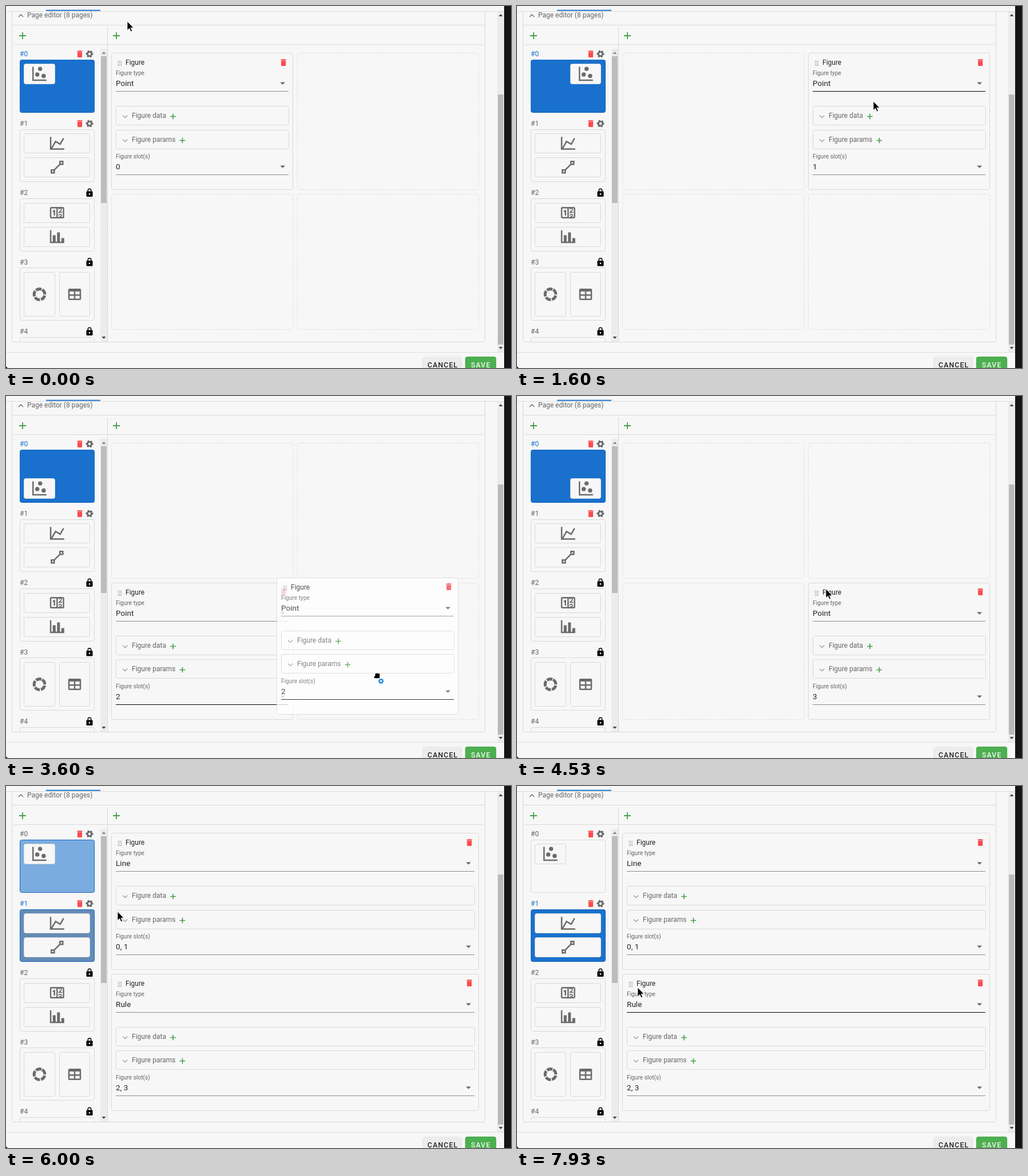
An HTML page that plays this animation: 883 by 634 pixels, repeating every 8 s.

```html
<!DOCTYPE html>
<html lang="en">
<head>
<meta charset="utf-8">
<title>Page editor</title>
<style>
  html, body { margin: 0; width: 100%; height: 100%; overflow: hidden; background: #f7f7f7; }
  svg { display: block; font-family: Roboto, sans-serif; font-size: 12px; }
</style>
</head>
<body>
<svg id="stage" width="883" height="634" viewBox="0 0 883 634"><g id="base"></g><g id="live"></g></svg>
<script>
const LOOP = 8000, STEP = 1000 / 15;
const BLUE = '#1971cd', GREY = '#666', EDGE = '#d9d9d9', PAPER = '#f7f7f7', GREEN = '#43a047';
const round = Math.round;

// Drawing helpers
const fill = (x, y, w, h, color, r = 0) =>
  `<rect x="${x}" y="${y}" width="${w}" height="${h}" rx="${r}" fill="${color}"/>`;
const box = (x, y, w, h, { bg = 'none', edge = EDGE, r = 3, dash = '' } = {}) =>
  `<rect x="${round(x) + .5}" y="${round(y) + .5}" width="${round(w)}" height="${round(h)}" rx="${r}" fill="${bg}" stroke="${edge}" stroke-dasharray="${dash}"/>`;
const text = (x, y, s, color = GREY, size = 12, extra = '') =>
  `<text x="${x}" y="${y}" fill="${color}" font-size="${size}" ${extra}>${s}</text>`;
const line = (d, color, w = 1, extra = '') =>
  `<path d="${d}" fill="none" stroke="${color}" stroke-width="${w}" ${extra}/>`;
const plus = (x, y, r, w) => line(`M${x - r} ${y}h${2 * r}M${x} ${y - r}v${2 * r}`, GREEN, w);
const chevron = (x, y, dir, color) => line(`M${x - 4} ${y - 2 * dir}l4 ${4 * dir}l4 ${-4 * dir}`, color, 1.3);
const triangle = (x, y, w, h, color) => `<path d="M${x - w} ${y - h / 2}h${2 * w}l${-w} ${h}z" fill="${color}"/>`;

// Icons on a 24-unit grid, placed by their centre
const ICONS = {
  trash: 'M19 4H15.5L14.5 3H9.5L8.5 4H5V6H19M6 19A2 2 0 0 0 8 21H16A2 2 0 0 0 18 19V7H6Z',
  lock: 'M12 17A2 2 0 0 0 12 13A2 2 0 0 0 12 17M18 8A2 2 0 0 1 20 10V20A2 2 0 0 1 18 22H6A2 2 0 0 1 4 20V10A2 2 0 0 1 6 8H7V6A5 5 0 0 1 17 6V8M12 3A3 3 0 0 0 9 6V8H15V6A3 3 0 0 0 12 3Z',
  scatter: 'M2 2H4V20H22V22H2Z' + [[9, 13], [13, 5], [18, 15]].map(([x, y]) => `M${x - 3} ${y}a3 3 0 0 1 6 0a3 3 0 0 1 -6 0`).join(''),
  lines: 'M16 11.78L20.24 4.45L21.97 5.45L16.74 14.5L10.23 10.75L5.46 19H22V21H2V3H4V17.54L9.5 8Z',
  rule: 'M15 3V7.59L7.59 15H3V21H9V16.42L16.42 9H21V3M17 5H19V7H17M5 17H7V19H5',
  bars: 'M22 21H2V3H4V19H6V10H10V19H12V6H16V19H18V14H22Z',
  table: 'M5 4H19A2 2 0 0 1 21 6V18A2 2 0 0 1 19 20H5A2 2 0 0 1 3 18V6A2 2 0 0 1 5 4M5 8V12H11V8M13 8V12H19V8M5 14V18H11V14M13 14V18H19V14'
};
const icon = (name, x, y, scale = 1.25, color = '#6b6b6b') =>
  `<path transform="translate(${x} ${y}) scale(${scale}) translate(-12 -12)" d="${ICONS[name]}" fill="${color}" fill-rule="evenodd"/>`;
const trash = (x, y) => icon('trash', x, y, .68, '#f94c4f');
const gear = (x, y) =>
  `<g fill="none" stroke="#666" transform="translate(${x} ${y}) rotate(-15)"><circle r="3.7" stroke-width="2.7"/><circle r="5.5" stroke-width="2" stroke-dasharray="3 2.76"/></g>`;
const counter = (x, y) =>
  `<g transform="translate(${x} ${y})" fill="none" stroke="#6b6b6b" stroke-width="2.4"><rect x="-11.3" y="-8.8" width="22.6" height="17.6" rx="1.5"/>` +
  `<path d="M0 -9V9M-7.5 -2.2L-4.6 -3.4V5"/><path stroke-width="1.7" d="M3.2 -6C4 -9 8.5 -8 7.4 -5L3.6 -.6H9M3.2 5C3.5 2 8 2 7.6 5Q7 7.5 4 7.4"/></g>`;
const donut = (x, y) =>
  `<circle cx="${x}" cy="${y}" r="9.3" fill="none" stroke="#6b6b6b" stroke-width="5" stroke-dasharray="9.9 1.79" transform="rotate(-60 ${x} ${y})"/>`;

function base() {
  const pageTop = i => 94.4 + 121.5 * i;
  let s = fill(0, 0, 883, 634, PAPER)
    + fill(0, 9, 871, 1, '#dcdcdc') + fill(70, 6.7, 95, 1.9, BLUE)
    + line('M10.5 10V584Q10.5 588.5 14.5 588.5H833Q837.5 588.5 837.5 584V10M10 33.5H837M14 67.5H834M177.5 38V588', EDGE)
    + chevron(26, 17, -1, GREY) + text(37, 20, 'Page editor (8 pages)')
    + plus(29, 52, 6, 1.8) + plus(193, 52, 6, 1.8);
  // Scroll bars
  s += fill(165, 75, 12, 513, '#ececec') + fill(166, 88, 10, 257, '#bcbcbc')
    + triangle(171, 82, 3.5, -4, '#8a8a8a') + triangle(171, 581, 3.5, 4, '#444')
    + fill(859, 10, 12, 596, '#ececec') + fill(860, 155, 9.5, 438, '#bababa')
    + triangle(865, 16, 3.5, -4, '#444') + triangle(865, 599, 3.5, 4, '#444')
    + fill(871, 0, 12, 634, '#131517');
  // Locked pages
  for (const i of [2, 3, 4]) {
    const y = pageTop(i);
    s += text(24, round(y - 6), '#' + i) + icon('lock', 146, y - 10.2, .69, '#000');
    if (i < 4) s += box(24, y - .5, 130, 92);
  }
  s += line('M24.5 588V584Q24.5 580.5 28 580.5H150Q154.5 580.5 154.5 584V588', EDGE)
    + box(31, 345, 115, 34) + counter(89.3, 362) + box(31, 387, 115, 34) + icon('bars', 89.3, 404)
    + box(31, 466, 54, 77) + donut(58.5, 505) + box(93, 466, 53, 77) + icon('table', 120, 505);
  // Footer
  const button = 'font-weight="500" letter-spacing="1.1"';
  s += fill(0, 606, 871, 1, '#dcdcdc')
    + fill(728.5, 615, 68.5, 24, '#d4d4d4', 4) + fill(729, 614, 67.5, 24, '#ececec', 4) + text(737, 633, 'CANCEL', '#222', 12.3, button)
    + fill(802.5, 615, 55, 24, '#c9d3c9', 4) + fill(803, 614, 54, 24, '#4caf50', 4) + text(813, 633, 'SAVE', '#eef6ee', 12.3, button)
    + '<path d="M0 631V634H3z" fill="#222"/>';
  return s;
}

function card(x, y, w, type, slots, hover, bg = 'none', h = 238.6) {
  const at = dy => round(y + dy);
  const select = (dy, label, value, dark) =>
    text(x + 8, at(dy) - 28, label, GREY, 10.2) + text(x + 8, at(dy) - 9, value, '#222', 13.6)
    + triangle(x + w - 17.3, at(dy) - 13.4, 4.4, 4.4, GREY)
    + fill(x + 8, at(dy), w - 15, 1, dark ? '#000' : '#8c8c8c');
  const section = (dy, label, plusX) =>
    box(x + 8, at(dy), w - 15, 33) + chevron(x + 24.3, at(dy) + 18.7, 1, '#999')
    + text(x + 36, at(dy) + 21, label) + plus(x + plusX, at(dy) + 18.5, 4.8, 1.6);
  return box(x, at(0), w, h, { bg })
    + line([12.5, 15, 17.5].map(dx => `M${x + dx} ${at(14)}v9.5`).join(''), '#888', 1.2, 'stroke-dasharray="1.2 1.4"')
    + text(x + 25, at(21), 'Figure', '#222') + trash(x + w - 15.8, at(16.5))
    + select(67, 'Figure type', type, hover === 'type')
    + section(93, 'Figure data', 108) + section(134.6, 'Figure params', 124.5)
    + select(213, 'Figure slot(s)', slots, hover === 'slot');
}

// Pointer path: time, x, y
const PATH = [
  [0, 212, 27], [120, 212, 27], [530, 197, 92], [720, 197, 93], [790, 206, 95], [1000, 597, 129], [1140, 640, 128],
  [1530, 625, 214], [1600, 623, 167], [1790, 623, 167], [2400, 369, 395], [2600, 306, 442], [2667, 307, 437],
  [3270, 359, 500], [3460, 359, 500], [3600, 648, 491], [3760, 711, 482], [4270, 600, 372], [4530, 540, 338],
  [4660, 540, 339], [4735, 508, 304], [5133, 294, 157], [5320, 214, 95], [5400, 208, 97], [5700, 100, 252],
  [5860, 104, 252], [6000, 195, 220], [6530, 197, 95], [6660, 197, 95], [7430, 213, 364], [7660, 213, 364], [7930, 211, 353]
];
// Drags: start, end, grab point
const DRAGS = [
  [760, 1140, 204, 95], [1795, 2660, 623, 167], [3465, 3790, 359, 500], [4680, 5330, 540, 339], [6665, 7430, 197, 95]
];
// Highlighted selects: start, end, field, card
const HOVERS = [
  [1595, 2660, 'type', 0], [3190, 4130, 'slot', 0], [6190, 6400, 'type', 0], [7720, 8000, 'type', 1]
];
const SWITCH = 5860;

function pointer(t) {
  const i = PATH.findIndex(p => p[0] > t);
  if (i < 0) return PATH.at(-1).slice(1);
  const [a, b] = [PATH[i - 1], PATH[i]], k = (t - a[0]) / (b[0] - a[0]);
  return [a[1] + (b[1] - a[1]) * k, a[2] + (b[2] - a[2]) * k];
}
const mix = (a, b, k) => `rgb(${a.map((v, i) => round(v + (b[i] - v) * k))})`;

function thumbs(slot, page, t) {
  const blue = [25, 113, 205], paper = [247, 247, 247], grey = [160, 160, 164];
  const k = Math.min(1, Math.max(0, (t - SWITCH - 7) / 300));
  const hovered = !page && t > 5660;
  const bgs = [mix(blue, paper, k), page ? mix(grey, blue, k) : mix(paper, grey, hovered ? .5 : 0)];
  let s = '';
  bgs.forEach((bg, i) => {
    const y = i ? 216 : 94, on = i === page || (i === 0 && k < 1);
    s += text(24, y - 6, '#' + i, i === page ? BLUE : GREY) + trash(129, y - 10) + gear(146, y - 10)
      + box(24, y, 130, i ? 91 : 92, { bg, edge: on ? '#1668c0' : EDGE });
  });
  const right = slot % 2, x = right ? 93 : 31, y = slot > 1 ? 144 : 101, item = { bg: PAPER };
  return s + box(x, y, right ? 53 : 54, 35, item) + icon('scatter', x + 27.4, y + 17.8, 1.24)
    + box(31, 223, 115, 34, item) + icon('lines', 89.3, 240.5)
    + box(31, 265, 115, 34, item) + icon('rule', 89.3, 282.3);
}

const arrow = (x, y) =>
  `<path transform="translate(${x} ${y})" d="M0 0V15.5L3.6 12.2L6.2 17.8L8.6 16.7L6.1 11.2H11Z" fill="#000" stroke="#fff" stroke-width=".8"/>`;
const hand = (x, y) => `<g transform="translate(${x} ${y})">`
  + '<path d="M-5 1.5L-3 -1L-2.5 -5Q0 -6.3 2 -5.5L5.5 -4.8Q6.6 -3 5.6 0V3.6H-2L-5.4 2.2Z" fill="#000" stroke="#fff" stroke-width=".7"/>'
  + '<circle cx="7.7" cy="8.3" r="4.4" fill="#1c86dc"/><path d="M5.2 8.3h5M7.7 5.8v5" stroke="#fff" stroke-width="1.3"/></g>';

function live(t) {
  const page = t < SWITCH ? 0 : 1;
  const drops = DRAGS.slice(0, 4).filter(d => t >= d[1]).length;
  const slot = drops % 4;
  const hover = HOVERS.find(h => t >= h[0] && t < h[1]);
  const lit = i => hover && hover[3] === i ? hover[2] : '';
  let s = thumbs(slot, page, t), cards;
  if (page) {
    cards = [[184, 82.4, 642, 'Line', '0, 1', lit(0)], [184, 328.6, 642, 'Rule', '2, 3', lit(1)]];
  } else {
    const low = slot > 1, lowY = low ? 326.8 : 328.6;
    const spot = i => [i % 2 ? 509 : 184, i > 1 ? lowY : 82.4];
    for (let i = 0; i < 4; i++) {
      const [x, y] = spot(i);
      if (i !== slot) s += box(x, y, 317, (i > 1) === low ? 238.6 : 237.4, { dash: '3 2', edge: '#dcdcdc' });
    }
    cards = [[...spot(slot), 317, 'Point', slot, lit(0)]];
  }
  s += cards.map(c => card(...c)).join('');

  const [x, y] = pointer(t);
  const drag = DRAGS.find(d => t >= d[0] && t < d[1]);
  if (!drag) return s + arrow(x, y);
  const [left, top, ...rest] = cards[0];
  return s + `<g opacity=".78">${card(round(left + x - drag[2]), top + round(y - drag[3]), ...rest, '#fff')}</g>` + hand(x, y);
}

document.getElementById('base').innerHTML = base();
const layer = document.getElementById('live');
let shown = -1;
function frame() {
  const n = Math.floor((performance.now() % LOOP + 4) / STEP) % (LOOP / STEP);
  if (n !== shown) layer.innerHTML = live((shown = n) * STEP);
  requestAnimationFrame(frame);
}
frame();
</script>
</body>
</html>
```
